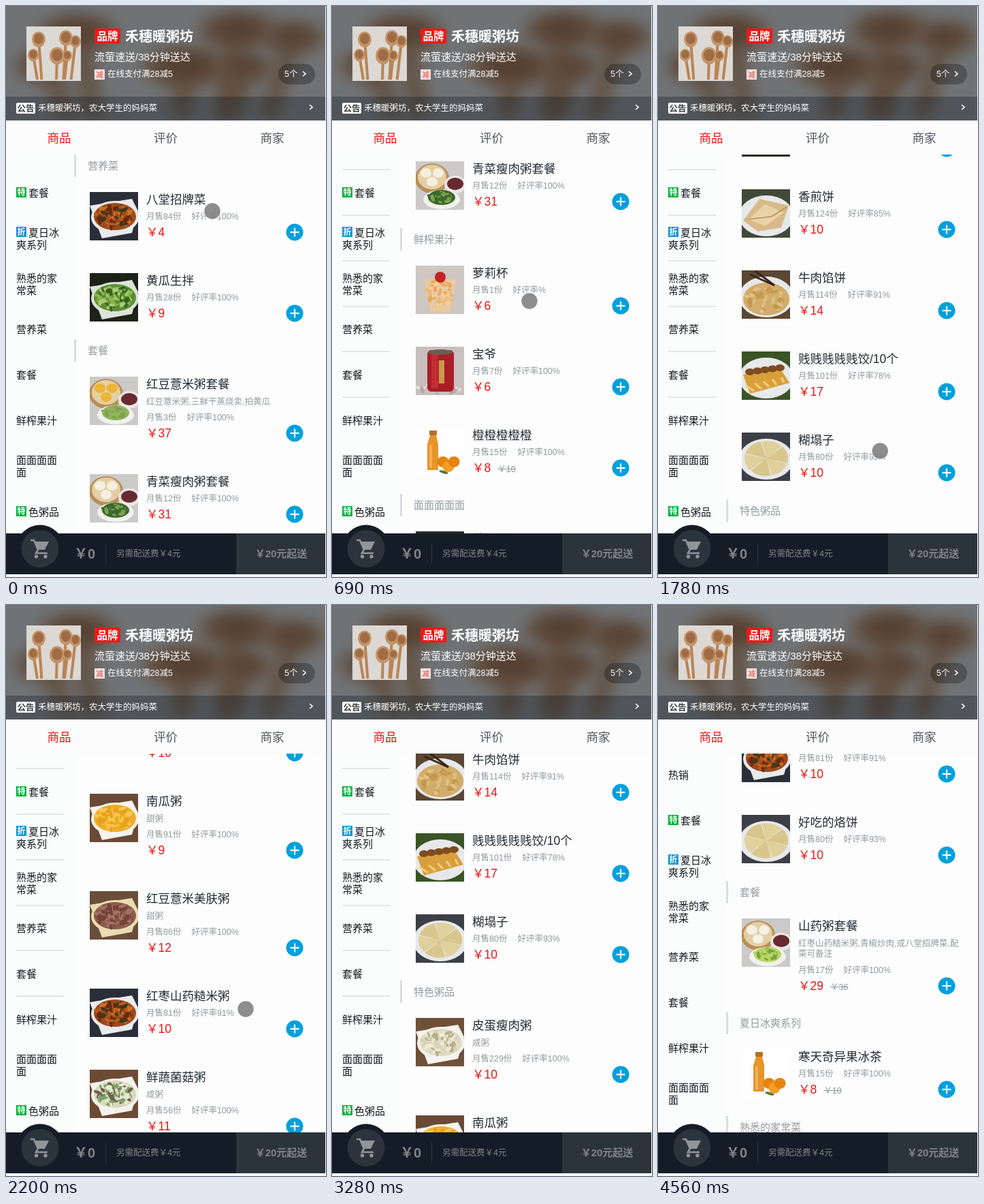
These frames come from a looping animation (470x838 px, 5270 ms). An HTML page with a canvas:

```html
<!DOCTYPE html>
<html lang="zh-CN">
<head>
<meta charset="utf-8">
<title>点餐</title>
<style>
html, body { margin: 0; width: 100%; height: 100%; overflow: hidden; background: #fdfdfd; }
canvas { display: block; width: 470px; height: 838px; }
</style>
</head>
<body>
<canvas id="stage" width="470" height="838"></canvas>
<script>
const ctx = document.getElementById('stage').getContext('2d');
const LOOP = 5270, STEP = 135, LAST_STEP = 30;
const TOP = 218, BOTTOM = 774, WIDTH = 469;
const GREY = '#93999f', RED = '#f01414';
const FONT = '"Liberation Sans", "Noto Sans CJK SC", "Noto Sans CJK", sans-serif';

// Key poses, timed in screen refreshes: [step, ...values]
const SCROLL = [[0, 0], [5, 459], [9, 650], [11, 650], [16, 1724], [20, 1892], [21, 1892], [23, 1620],
  [24, 1252], [28, -689], [30, -922]];
const POINTER = [[0, 303, 301], [5, 290, 433], [9, 351, 522], [11, 309, 693], [16, 352, 593], [22, 345, 330],
  [24, 330, 880], [26, 330, 880], [28, 255, 467], [30, 318, 483]];

const MENU = ['热销', '特套餐', '折夏日冰/爽系列', '熟悉的家/常菜', '营养菜', '套餐', '鲜榨果汁', '面面面面/面', '特色粥品'];
const BADGES = { 特: '#00b43c', 折: '#1296d4' };

// "#" starts a section; a dish is: name, sold, rating, price, picture, old price, description
const FOODS = `
# 热销
红枣山药糙米粥 81 91% 10 stew
好吃的烙饼 80 93% 10 wedges
# 套餐
山药粥套餐 17 100% 29 setLime 36 红枣山药糙米粥,青椒炒肉,或八堂招牌菜,配|菜可备注
# 夏日冰爽系列
寒天奇异果冰茶 15 100% 8 bottle 10
# 熟悉的家常菜
玉上豆腐 43 92% 17 tofu
手撕包菜 29 100% 16 greens
香酥小黄鱼/3条 15 100% 11 noodles
# 营养菜
八堂招牌菜 84 100% 4 stew
黄瓜生拌 28 100% 9 cucumber
# 套餐
红豆薏米粥套餐 3 100% 37 setGold - 红豆薏米粥,三鲜干蒸烧卖,拍黄瓜
青菜瘦肉粥套餐 12 100% 31 setGreen
# 鲜榨果汁
萝莉杯 1 % 6 cup
宝爷 7 100% 6 can
橙橙橙橙橙 15 100% 8 bottle 10
# 面面面面面
黄豆炒面 188 96% 14 noodles
香煎饼 124 85% 10 flatbread
牛肉馅饼 114 91% 14 pie
贱贱贱贱贱饺/10个 101 78% 17 dumplings
糊塌子 80 93% 10 wedges
# 特色粥品
皮蛋瘦肉粥 229 100% 10 congee - 咸粥
南瓜粥 91 100% 9 pumpkin - 甜粥
红豆薏米美肤粥 86 100% 12 redbean - 甜粥
红枣山药糙米粥 81 91% 10 stew
鲜蔬菌菇粥 56 100% 11 veggie - 咸粥
田园蔬菜粥 33 100% 10 veggie - 咸粥`.trim().split('\n').map(s => s.split(' '));

// backdrop, plate, food, then garnish colours
const DISHES = {
  stew: ['#2b2d38', '#e8eaec', '#9c4a1a', '#cf6f2a', '#6a2a12', '#b85a20', '#3c3a1c'],
  cucumber: ['#1d2118', '#dbe3da', '#5d8f32', '#a9cc70', '#35621f', '#8ab450'],
  tofu: ['#8a9a80', '#f2f3ee', '#cfe0a8', '#f4f2dc', '#a8c870', '#e8ecc8'],
  greens: ['#35502a', '#e4eadc', '#6fa548', '#a6cf78', '#37702c'],
  noodles: ['#2d2926', '#f0efec', '#b06a24', '#d08a36', '#71431a', '#6a7a2c'],
  congee: ['#6f5039', '#f4f3ef', '#e0dbc2', '#eeead6', '#b5ae8c', '#d8d2b4'],
  pumpkin: ['#6a4a35', '#f5f3ee', '#efae28', '#f8ca52', '#e8a020'],
  redbean: ['#6a4d3a', '#e8dcb0', '#8b5a4c', '#a57264', '#744238'],
  veggie: ['#6c4a34', '#f3f3ee', '#d8d8bc', '#7fa464', '#e9e8d4', '#6e6250']
};

const clamp = v => Math.min(1, Math.max(0, v));

function at(track, step) {
  const next = track.findIndex(key => key[0] > step);
  if (next < 0) return track[track.length - 1].slice(1);
  const a = track[next - 1], b = track[next];
  const k = (step - a[0]) / (b[0] - a[0]);
  return a.slice(1).map((v, i) => v + (b[i + 1] - v) * k);
}

function rect(x, y, w, h, color) {
  ctx.fillStyle = color;
  ctx.fillRect(x, y, w, h);
}

function round(x, y, w, h, r, color) {
  ctx.fillStyle = color;
  ctx.beginPath();
  ctx.roundRect(x, y, w, h, r);
  ctx.fill();
}

function outline(x, y, w, h, r, color, width) {
  ctx.strokeStyle = color;
  ctx.lineWidth = width;
  ctx.beginPath();
  ctx.roundRect(x, y, w, h, r);
  ctx.stroke();
}

function oval(x, y, rx, ry, color, turn = 0) {
  ctx.fillStyle = color;
  ctx.beginPath();
  ctx.ellipse(x, y, rx, ry, turn, 0, 7);
  ctx.fill();
}

function poly(points, color) {
  ctx.fillStyle = color;
  ctx.beginPath();
  points.forEach(p => ctx.lineTo(...p));
  ctx.fill();
}

function line(points, color, width = 1) {
  ctx.strokeStyle = color;
  ctx.lineWidth = width;
  ctx.beginPath();
  points.forEach(p => ctx.lineTo(...p));
  ctx.stroke();
}

// Text is centred vertically on cy; returns its width.
function text(str, x, cy, size, color, weight = 400, align = 'left', family = FONT) {
  ctx.font = `${weight} ${size}px ${family}`;
  ctx.textAlign = align;
  ctx.fillStyle = color;
  ctx.fillText(str, x, cy + size * 0.38);
  return ctx.measureText(str).width;
}

function clipped(x, y, w, h, draw) {
  ctx.save();
  ctx.beginPath();
  ctx.rect(x, y, w, h);
  ctx.clip();
  draw();
  ctx.restore();
}

function random(seed) {
  return () => (seed = (seed * 16807) % 2147483647) / 2147483647;
}

// Scatter small pieces of food over an ellipse.
function scatter(x, y, rx, ry, colors, count) {
  const rnd = random(77);
  for (let i = 0; i < count; i++) {
    const a = rnd() * 6.28, r = Math.sqrt(rnd()) * 0.9;
    oval(x + Math.cos(a) * rx * r, y + Math.sin(a) * ry * r, 2 + rnd() * 4, 1 + rnd() * 2,
      colors[i % colors.length], rnd() * 3);
  }
}

function dish([back, plate, food, ...bits]) {
  rect(0, 0, 71, 71, back);
  poly([[0, 20], [62, 10], [71, 28], [62, 60], [18, 68]], plate);
  oval(37, 37, 35, 24, plate);
  oval(37, 36, 31, 20, food);
  scatter(37, 36, 29, 18, bits, 80);
}

function setMeal(bun, greens) {
  rect(0, 0, 71, 71, '#cbcac9');
  oval(24, 25, 25, 22, '#b98f58');
  oval(24, 23, 21, 18, '#e4cfa4');
  for (let i = 0; i < 3; i++) oval(15 + i * 9, 17 + (i % 2) * 13, 8, 7, bun);
  oval(58, 34, 16, 13, '#ece7e4');
  oval(58, 33, 12, 9, '#682a30');
  oval(38, 56, 27, 14, '#f1f1ed');
  oval(38, 53, 20, 11, greens);
  scatter(38, 53, 18, 9, [greens, '#7ea04e'], 20);
}

function bread(back, draw) {
  rect(0, 0, 71, 71, back);
  oval(36, 39, 40, 30, '#e6e8ea');
  draw();
}

const PICS = {
  setGold: () => setMeal('#eeb436', '#8fb45c'),
  setGreen: () => setMeal('#f5efdf', '#386a2c'),
  setLime: () => setMeal('#f5f0e4', '#b5d85c'),
  cup() {
    rect(0, 0, 71, 71, '#cec6c0');
    poly([[12, 20], [60, 20], [50, 69], [22, 69]], '#e8c9a2');
    scatter(36, 40, 20, 24, ['#e9a660', '#f4cf98', '#efb878'], 50);
    oval(36, 17, 8, 8, '#c02428');
  },
  can() {
    rect(0, 0, 71, 71, '#c8bfbe');
    scatter(36, 62, 36, 9, ['#e6dfe0', '#b9a7a8'], 20);
    round(17, 5, 39, 61, 6, '#a81e28');
    rect(23, 9, 10, 52, '#c22c34');
    oval(36, 8, 18, 4, '#6f5d50');
    rect(34, 20, 8, 34, '#c89a48');
  },
  bottle() {
    rect(0, 0, 71, 71, '#fefefe');
    round(20, 4, 11, 7, 1, '#b4702c');
    poly([[21, 11], [30, 11], [33, 24], [33, 62], [17, 62], [17, 24]], '#e89428');
    rect(20, 25, 4, 34, '#f2b05a');
    for (let i = 0; i < 3; i++) oval(40 + i * 8, 50 + (i % 2) * 7, 8.5, 8, i % 2 ? '#f2a024' : '#e68410');
    oval(41, 65, 7, 2, '#557a30', 0.3);
  },
  flatbread: () => bread('#414a38', () => {
    poly([[2, 46], [26, 14], [69, 24], [58, 56], [24, 62]], '#d9b988');
    poly([[10, 44], [34, 22], [62, 34], [34, 54]], '#e8d2a8');
    line([[10, 44], [44, 40], [66, 26]], '#bd9150', 1.5);
  }),
  pie: () => bread('#5c4634', () => {
    oval(36, 42, 34, 24, '#d2ac68');
    scatter(36, 42, 31, 21, ['#dfc184', '#c39850'], 40);
    for (let i = 0; i < 2; i++) line([[12 + i * 8, 6 - i * 5], [48, 22]], '#3c2618', 3);
  }),
  dumplings: () => bread('#3a5426', () => {
    poly([[2, 34], [56, 24], [70, 46], [12, 62]], '#d99f3c');
    for (let i = 0; i < 5; i++) {
      line([[6 + i * 13, 50 - i * 3], [18 + i * 11, 58 - i * 3]], '#f1cf78', 3);
      oval(12 + i * 11, 30 - i * 1.5, 7, 5, '#7e4c20');
    }
  }),
  wedges: () => bread('#3d3f47', () => {
    ctx.save();
    ctx.translate(36, 38);
    ctx.scale(1, 0.8);
    for (let i = 0; i < 6; i++) {
      const a = i * 1.05 + 0.3;
      ctx.fillStyle = i % 2 ? '#d8c68c' : '#e0d09c';
      ctx.beginPath();
      ctx.moveTo(0, 0);
      ctx.arc(0, 0, 32, a, a + 1);
      ctx.fill();
    }
    ctx.restore();
  })
};

function picture(kind, x, y) {
  ctx.save();
  ctx.translate(x, y);
  clipped(0, 0, 71, 71, () => DISHES[kind] ? dish(DISHES[kind]) : PICS[kind]());
  ctx.restore();
}

// Stack the rows, then put the 营养菜 heading at the top edge for zero scroll.
const rows = [];
let stack = 0;
FOODS.forEach((food, i) => {
  if (food[0] === '#') {
    if (i) stack -= 21.7;
    rows.push({ y: stack, title: food[1] });
    stack += 55;
  } else {
    const desc = food[6] ? food[6].split('|') : [];
    const extra = desc.length && 8 + desc.length * 16;
    rows.push({ y: stack, food, desc, extra });
    stack += 119 + extra;
  }
});
const origin = TOP - rows.find(r => r.title === '营养菜').y;

function drawFood({ food, desc, extra }, y) {
  const [name, sold, rate, price, kind, old] = food;
  const metaY = y + 35 + extra, priceY = y + 58 + extra;
  picture(kind, 123, y);
  text(name, 206, y + 10, 17.5, '#222a33', 300);
  desc.forEach((d, i) => text(d, 206, y + 36 + i * 15, 12.5, GREY, 300));
  const w = text(`月售${sold}份`, 206, metaY, 12.5, GREY, 300);
  text(`好评率${rate}`, 221 + w, metaY, 12.5, GREY, 300);
  const pw = text('￥' + price, 206, priceY, 17.5, RED);
  if (old > 0) {
    const x = 216 + pw;
    const ow = text('￥' + old, x, priceY + 2, 12.5, GREY);
    line([[x, priceY + 2.5], [x + ow, priceY + 2.5]], GREY);
  }
  const cy = priceY + 1;
  oval(424, cy, 12.5, 12.5, '#00a0dc');
  line([[417.5, cy], [430.5, cy]], '#fff', 2.2);
  line([[424, cy - 6.5], [424, cy + 6.5]], '#fff', 2.2);
}

function drawList(step) {
  const [scroll] = at(SCROLL, step);
  clipped(100, TOP, 369, BOTTOM - TOP, () => rows.forEach(row => {
    const y = Math.round(origin + row.y - scroll);
    if (y > BOTTOM || y < TOP - 170) return;
    if (row.food) return drawFood(row, y);
    rect(100, y, 3, 33, '#d9dde1');
    text(row.title, 120, y + 16, 15, GREY);
  }));
}

function drawMenu(step) {
  const shift = -42 * clamp((28.8 - step) / 4.8);
  const ruled = step > 0 && step < 29;
  clipped(0, TOP, 100, BOTTOM - TOP, () => {
    rect(0, TOP, 100, BOTTOM - TOP, '#fbfcfc');
    MENU.forEach((label, i) => {
      const cy = Math.round(249.2 + i * 66.8 + shift);
      const badge = BADGES[label[0]];
      const [a, b] = (badge ? label.slice(1) : label).split('/');
      const y = b ? cy - 9 : cy;
      if (badge) {
        rect(15, y - 8, 15, 15, badge);
        text(label[0], 22.5, y - 0.5, 12, '#fff', 700, 'center');
      }
      text(a, badge ? 33 : 15, y, 15, '#14191e');
      if (b) text(b, 15, cy + 9, 15, '#14191e');
      if (ruled && i < 6) rect(15, cy + 32, 70, 2, '#e4e7e8');
    });
  });
}

function chevron(x, y) {
  line([[x - 2, y - 3.5], [x + 2, y], [x - 2, y + 3.5]], '#fff', 1.6);
}

// The shop photo on an 80 x 80 field.
function spoons() {
  rect(-20, -20, 120, 120, '#dcd8d4');
  [[18, 19, 10], [10, 42, 8], [45, 43, 11], [58, 17, 10], [60, 43, 7], [72, 22, 8]].forEach(([x, y, r]) => {
    line([[x, y], [x + (40 - x) * 0.2, 78]], '#b98455', 4);
    oval(x, y, r, r * 1.15, '#c3946a');
    oval(x, y - 1, r * 0.7, r * 0.8, '#a06c44');
  });
}

function drawHeader() {
  // The backdrop is the same photo, stretched, blurred and dimmed.
  clipped(0, 0, WIDTH, 168, () => {
    ctx.scale(WIDTH / 80, 168 / 80);
    ctx.filter = 'blur(13px)';
    spoons();
    ctx.filter = 'none';
    rect(0, 0, 80, 80, 'rgba(7,17,27,.5)');
  });
  clipped(30, 30, 80, 80, () => {
    ctx.translate(30, 30);
    spoons();
  });
  round(130, 33, 38, 22, 2, '#f01818');
  text('品牌', 149, 44, 15.5, '#fff', 700, 'center');
  text('禾穗暖粥坊', 175, 44, 20, '#fff', 700);
  text('流萤速送/38分钟送达', 130, 74, 15, '#fff');
  rect(130, 93, 15, 15, '#f6e4e2');
  text('减', 137.5, 100.5, 11, '#e0483c', 400, 'center');
  text('在线支付满28减5', 149, 99.5, 12.5, '#fff');
  round(400, 85, 54, 30, 15, 'rgba(0,0,0,.28)');
  text('5个', 409, 99.5, 12.5, '#fff');
  chevron(438, 99.5);

  rect(0, 133, WIDTH, 35, 'rgba(7,17,27,.3)');
  round(15, 142, 28, 16, 2, '#fff');
  text('公告', 29, 150, 12.5, '#3c3f42', 700, 'center');
  text('禾穗暖粥坊，农大学生的妈妈菜', 47, 149, 12.5, '#fff');
  chevron(448, 148.5);

  rect(0, 168, 470, 50, '#fcfcfc');
  ['商品', '评价', '商家'].forEach((s, i) =>
    text(s, 78 + i * 156.5, 193, 17.5, i ? '#4d555d' : RED, 400, 'center'));
}

function drawCart() {
  const dark = '#141d27', soft = '#80858a', icon = '#90959a';
  rect(0, BOTTOM, WIDTH, 60, dark);
  rect(338, BOTTOM, 131, 60, '#2b333b');
  oval(50, 796.5, 35, 35, dark);
  rect(0, 834, 470, 4, '#fafafa');
  oval(50, 796.5, 27.5, 27.5, '#2b343c');
  line([[36, 784], [41, 784], [47, 798], [44, 803], [61, 803]], icon, 2.6);
  poly([[41, 786], [63, 786], [57, 798], [47, 798]], icon);
  for (const x of [44.5, 58]) oval(x, 808, 2.7, 2.7, icon);
  text('￥0', 100, 803.5, 20, soft, 700);
  rect(146, 789, 1, 30, '#2c353e');
  text('另需配送费￥4元', 162, 803, 12.5, soft);
  text('￥20元起送', 404, 803.5, 15, soft, 700, 'center');
}

function drawPreview() {
  const x = 140, y = 653, w = 292, h = 190;
  ctx.save();
  ctx.shadowColor = '#000';
  ctx.shadowBlur = 12;
  outline(x - 1, y - 1, w + 2, h, 7, '#2d343b', 3);
  ctx.restore();
  clipped(x, y, w, h, () => {
    ctx.filter = 'blur(4px)';
    ctx.drawImage(ctx.canvas, x, y + 5, w, 180, x, y + 5, w, 180);
    ctx.filter = 'none';
    ctx.globalCompositeOperation = 'multiply';
    const tint = ctx.createLinearGradient(0, y, 0, y + 70);
    tint.addColorStop(0, '#7c8da2');
    tint.addColorStop(0.5, '#8299b5');
    tint.addColorStop(1, '#95b1d0');
    rect(x, y, w, h, tint);
  });
  outline(x + 0.5, y + 0.5, w - 1, h, 6, 'rgba(225,235,245,.85)', 1);
  rect(162, 676, 17, 17, '#f0f0f0');
  text('introduce1.gif - LICEcap [rec...', 186, 684.5, 15, '#fff', 400, 'left', '"Open Sans", "Noto Sans", sans-serif');
  outline(249.5, 701.5, 71, 132, 0, '#e6eaee', 1.5);
  for (const edge of [701, 828]) rect(249, edge, 72, 6, '#e6eaee');
  rect(253, 703, 50, 1, '#8c9298');
}

function drawPointer(step) {
  const [x, y] = at(POINTER, step);
  oval(x, y, 13, 13, 'rgba(255,255,255,.55)');
  oval(x, y, 11.7, 11.7, 'rgba(112,112,114,.8)');
}

function draw(step, pointing) {
  rect(0, 0, 470, 838, '#fdfdfd');
  drawMenu(step);
  drawList(step);
  drawHeader();
  drawCart();
  if (step > 24 && step < 29) drawPreview();
  if (pointing) drawPointer(step);
}

const start = performance.now();
let shown = '';
function tick() {
  const t = (performance.now() - start) % LOOP;
  const step = Math.min(LAST_STEP, Math.floor(t / STEP));
  const pointing = t < 4560;
  const state = `${step} ${pointing}`;
  if (state !== shown) draw(step, pointing);
  shown = state;
  requestAnimationFrame(tick);
}
tick();
</script>
</body>
</html>
```
